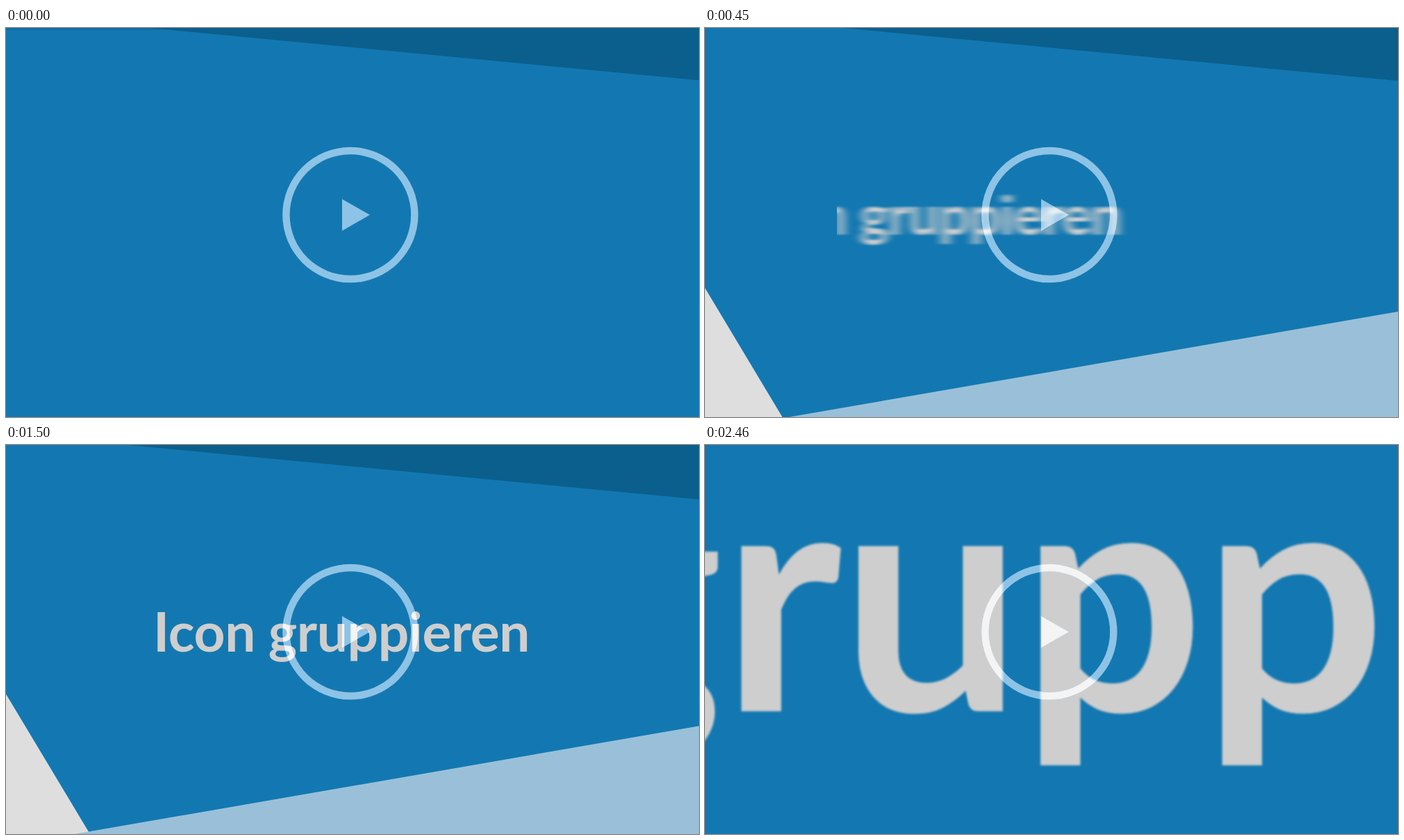
These frames come from a looping animation (998 px wide and 561 px high, 2.49 s). An HTML page:

```html
<!DOCTYPE html>
<html lang="de">
<head>
<meta charset="utf-8">
<title>Icon gruppieren</title>
<style>
  html, body { margin: 0; width: 100%; height: 100%; overflow: hidden; background: #1378b1; }
  svg { display: block; width: 100vw; height: 100vh; }
  text { font: bold 78.5px Lato, sans-serif; letter-spacing: -.005em; text-anchor: middle; fill: currentColor; }
</style>
</head>
<body>
<svg viewBox="0 0 998 561">
  <defs>
    <path id="play" clip-rule="evenodd" fill-rule="evenodd"
      d="M398.2 269.5a97.7 97.7 0 1 0 195.4 0a97.7 97.7 0 1 0 -195.4 0z
         M408.6 269.5a87.3 87.3 0 1 0 174.6 0a87.3 87.3 0 1 0 -174.6 0z
         M484 246.8L524 269.6L484 292.5z"/>
    <clipPath id="playClip"><use href="#play" clip-rule="evenodd"/></clipPath>
    <clipPath id="box"><rect x="190" y="180" width="640" height="200"/></clipPath>
    <filter id="soften" filterUnits="userSpaceOnUse" x="-500" y="150" width="1600" height="260"
      color-interpolation-filters="sRGB"><feGaussianBlur id="blur" stdDeviation="0"/></filter>
    <g id="title">
      <g class="zoom"><g clip-path="url(#box)">
        <g id="slide"><text x="483.1" y="298">Icon gruppieren</text></g>
      </g></g>
    </g>
  </defs>
  <rect width="998" height="561" fill="#1378b1"/>
  <rect id="strip" width="236" height="2.5" fill="#0f6c9f"/>
  <g class="zoom">
    <polygon id="dark" fill="#0b5f8d"/>
    <polygon id="gray" fill="#dedede"/>
    <polygon id="light" fill="#99c0d8"/>
  </g>
  <use href="#title" color="#cecece"/>
  <use href="#play" fill="#8dc3e6"/>
  <g clip-path="url(#playClip)"><use href="#title" color="#f4f4f4"/></g>
</svg>
<script>
  const LOOP = 2490, STEP = 30;
  const ENTER = 330, SLIDE_END = 540, ZOOM_START = 2160, ZOOM_END = 2460;
  const $ = id => document.getElementById(id);
  const zoomed = document.querySelectorAll('.zoom');
  const points = (id, ...list) => $(id).setAttribute('points', list.join(' '));

  // Share of the entrance still to go, cubic ease-out
  const entering = t => Math.max(0, 1 - t / ENTER) ** 3;

  // Edge heights: a slow drift in seconds plus the entrance
  function drawShapes(t) {
    const s = t / 1000, e = entering(t);
    const dark = 75.5 + 1.4 * s + .4 * s * s;
    const light = 411.5 - 6 * s + 1.2 * s * s + 155 * e;
    const gray = 377.8 - 3.3 * s - 6.1 * s * s + 188 * e;
    points('dark', 0, dark - 95.3, 998, dark, 998, -120);
    points('light', 0, light + 173, 998, light, 998, 800, 0, 800);
    points('gray', 0, gray, 400, gray + 668, 0, 1300);
    $('strip').setAttribute('opacity', Math.max(0, 1 - t / STEP));
  }

  // The title slides in behind the left edge of its box, smeared while it moves
  function drawTitle(t, scale) {
    const left = Math.max(0, SLIDE_END - t);
    const slide = $('slide');
    slide.setAttribute('transform', `translate(${-1.72 * left} 0)`);
    $('blur').setAttribute('stdDeviation', left ? '7 1' : .35 * (1 - 1 / scale));
    if (left || scale > 1) slide.setAttribute('filter', 'url(#soften)');
    else slide.removeAttribute('filter');
  }

  function draw(t) {
    const scale = t > ZOOM_START ? 1 + 4.92 * Math.exp((t - ZOOM_END) / 37.5) : 1;
    drawShapes(t);
    drawTitle(t, scale);
    for (const el of zoomed)
      el.setAttribute('transform', `translate(499 280.5) scale(${scale}) translate(-499 -280.5)`);
  }

  const start = performance.now();
  function tick() {
    const t = (performance.now() - start) % LOOP;
    draw(Math.floor(t / STEP) * STEP);
    requestAnimationFrame(tick);
  }
  draw(0);
  requestAnimationFrame(tick);
</script>
</body>
</html>
```
